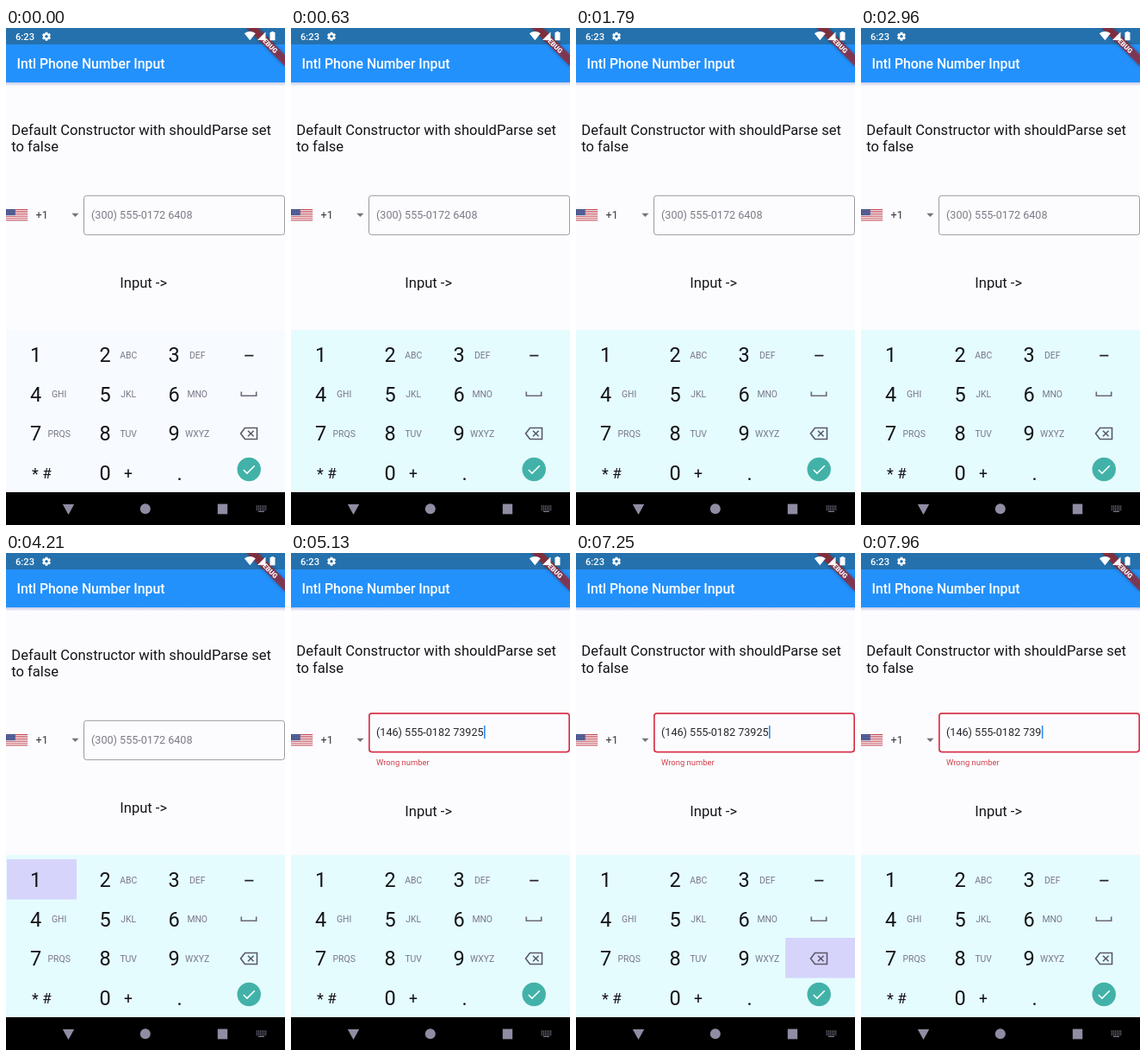
An HTML page with a canvas that plays this animation: 324 by 576 pixels, repeating every 8000 ms.

```html
<!DOCTYPE html>
<html lang="en">
<head>
<meta charset="utf-8">
<title>Phone input</title>
<style>
html, body { margin: 0; width: 100%; height: 100%; overflow: hidden; background: #fcfcfe; }
canvas { display: block; width: 100vw; height: 100vh; }
</style>
</head>
<body>
<canvas id="stage"></canvas>
<script>
const W = 324, H = 576, LOOP = 8000;
const canvas = document.getElementById('stage');
const ctx = canvas.getContext('2d');

const HINT = '(300) 555-0172 6408';
const DIGITS = '146555018273925';
const TYPE_START = 4270, TYPE_STEP = 55, PRESS = 80;
const TYPE_END = TYPE_START + (DIGITS.length - 1) * TYPE_STEP;
const DELETES = [7300, 7700];
const COL_X = [34.5, 115, 195, 282], ROW_Y = [379, 424.5, 470, 515.5];
const LETTERS = ['', 'ABC', 'DEF', 'GHI', 'JKL', 'MNO', 'PRQS', 'TUV', 'WXYZ'];
const INK = '#141418', KEY_GREY = '#787688', NAV_GREY = '#8f8ca3';

function resize() {
  const dpr = window.devicePixelRatio || 1;
  canvas.width = Math.round(innerWidth * dpr);
  canvas.height = Math.round(innerHeight * dpr);
}

function rect(x, y, w, h, color) {
  ctx.fillStyle = color;
  ctx.fillRect(x, y, w, h);
}

function circle(x, y, r, color) {
  ctx.fillStyle = color;
  ctx.beginPath();
  ctx.arc(x, y, r, 0, Math.PI * 2);
  ctx.fill();
}

function trace(points, closed) {
  ctx.beginPath();
  points.forEach(([x, y], i) => i ? ctx.lineTo(x, y) : ctx.moveTo(x, y));
  if (closed) ctx.closePath();
}

function poly(color, ...points) {
  ctx.fillStyle = color;
  trace(points, true);
  ctx.fill();
}

function line(color, width, points, closed = false) {
  ctx.strokeStyle = color;
  ctx.lineWidth = width;
  trace(points, closed);
  ctx.stroke();
}

function text(str, x, y, size, color, weight = 400, align = 'left') {
  ctx.font = `${weight} ${size}px Roboto, sans-serif`;
  ctx.textAlign = align;
  ctx.fillStyle = color;
  ctx.fillText(str, x, y);
}

function formatPhone(d) {
  if (d.length <= 3) return d;
  let s = `(${d.slice(0, 3)}) ${d.slice(3, 6)}`;
  if (d.length > 6) s += '-' + d.slice(6, 10);
  if (d.length > 10) s += ' ' + d.slice(10);
  return s;
}

// Everything that varies with time
function stateAt(t) {
  const typed = t < TYPE_START ? 0
    : Math.min(DIGITS.length, Math.floor((t - TYPE_START) / TYPE_STEP) + 1);
  const deleted = DELETES.filter(d => t >= d).length;
  const lastEdit = deleted ? DELETES[deleted - 1] : Math.min(t, TYPE_END);
  let key = null;
  if (t >= TYPE_START - PRESS && t < TYPE_END) {
    const n = +DIGITS[typed];
    key = n ? [(n - 1) % 3, Math.floor((n - 1) / 3)] : [1, 3];
  } else if (DELETES.some(d => t >= d - PRESS && t < d)) {
    key = [3, 2];
  }
  return {
    phone: formatPhone(DIGITS.slice(0, typed - deleted)),
    cursor: typed > 0 && Math.floor((t - lastEdit) / 500) % 2 === 0,
    fade: Math.max(0, Math.min(1, (t - 40) / 360)),
    key
  };
}

function drawBanner() {
  ctx.save();
  ctx.translate(W, 0);
  ctx.rotate(Math.PI / 4);
  ctx.shadowColor = 'rgba(0,0,0,.5)';
  ctx.shadowBlur = 4;
  rect(-31.5, 22, 63, 9.5, 'rgba(183,28,28,.63)');
  ctx.shadowColor = 'transparent';
  text('DEBUG', 0, 29.6, 8, '#fff', 900, 'center');
  ctx.restore();
}

function drawGear(x, y) {
  ctx.save();
  ctx.translate(x, y);
  for (let i = 0; i < 6; i++) {
    ctx.rotate(Math.PI / 3);
    rect(-1.4, -5, 2.8, 4, '#fff');
  }
  ctx.restore();
  circle(x, y, 3.7, '#fff');
  circle(x, y, 1.7, '#2571ad');
}

function drawStatus() {
  text('6:23', 11, 14, 11.2, '#fff', 500);
  drawGear(47, 9.7);
  ctx.fillStyle = '#fff';
  ctx.beginPath();
  ctx.moveTo(283.3, 14.2);
  ctx.lineTo(276.8, 6.3);
  ctx.quadraticCurveTo(283.3, 1.8, 289.8, 6.3);
  ctx.fill();
  poly('#fff', [292, 14], [301.5, 14], [301.5, 4.5]);
  rect(306.5, 5, 6, 9.3, '#fff');
  rect(308.2, 4, 2.6, 1.2, '#fff');
}

function drawBars() {
  rect(0, 19, W, 44, '#2391fc');
  rect(0, 0, W, 19, '#2571ad');
  const shade = ctx.createLinearGradient(0, 63, 0, 67.5);
  shade.addColorStop(0, '#c4cae8');
  shade.addColorStop(1, '#fcfcfe');
  rect(0, 63, W, 4.5, shade);
  text('Intl Phone Number Input', 12.6, 47, 15.75, '#fff', 500);
  drawBanner();
  drawStatus();
}

function drawFlag() {
  const h = 13.4 / 13;
  for (let i = 0; i < 13; i++) {
    rect(0, 210 + i * h, 25.2, h, i % 2 ? '#f6f2f4' : '#c4414f');
  }
  rect(0, 210, 10.8, 7 * h, '#3f4a86');
  for (let r = 0; r < 4; r++) {
    for (let c = 0; c < 5; c++) rect(1 + c * 2 + (r % 2) * .6, 211 + r * 1.7, .7, .7, '#c9cce2');
  }
}

function drawField(y, color, width) {
  const half = width / 2;
  ctx.strokeStyle = color;
  ctx.lineWidth = width;
  ctx.beginPath();
  ctx.roundRect(90 + half, y + half, 234 - width, 46.4 - width, 3);
  ctx.stroke();
}

function drawForm(s) {
  const error = s.phone !== '';
  const shift = error ? 4.3 : 0;
  text('Default Constructor with shouldParse set', 6.3, 123.6 - shift, 16.55, INK);
  text('to false', 6.3, 143.2 - shift, 16.55, INK);
  text('Input ->', 132.3, 300.5 + shift, 16.55, INK);

  drawFlag();
  text('+1', 34.6, 221, 12.6, '#36363c');
  poly('#747480', [76.3, 214.8], [84.5, 214.8], [80.4, 219]);

  if (!error) {
    drawField(193.8, '#999aa0', 1);
    text(HINT, 99, 220.6, 12.6, '#7c7b88');
    return;
  }
  drawField(185, '#d8344a', 1.7);
  text(s.phone, 99, 211.8, 12.6, '#26262c');
  if (s.cursor) rect(99.4 + ctx.measureText(s.phone).width, 200, 1.6, 15, '#2a8cf0');
  text('Wrong number', 99, 246.4, 9.44, '#d0404c');
}

function drawBackspace() {
  line('#5b5868', 1.6, [[272.5, 470], [277.5, 463.5], [291.5, 463.5], [291.5, 476.5], [277.5, 476.5]], true);
  line('#5b5868', 1.6, [[281, 466.7], [287.6, 473.3]]);
  line('#5b5868', 1.6, [[287.6, 466.7], [281, 473.3]]);
}

function drawKeyboard(s) {
  const mix = (a, b) => Math.round(a + (b - a) * s.fade);
  rect(0, 350, W, 188, `rgb(${mix(247, 229)},${mix(251, 252)},255)`);
  if (s.key) {
    const [c, r] = s.key;
    rect(1 + c * 80.7, 355 + r * 45.5, 81, 46.5, '#d6d4fb');
  }
  LETTERS.forEach((label, i) => {
    const x = COL_X[i % 3], y = ROW_Y[Math.floor(i / 3)];
    text(String(i + 1), x, y + 8.4, 23.5, INK, 400, 'center');
    text(label, x + 27.2, y + 3.6, 10.4, KEY_GREY, 400, 'center');
  });
  text('*', 34, 523, 18, INK, 400, 'center');
  text('#', 47.5, 522.3, 17, INK, 400, 'center');
  text('0', 115, 524, 23.5, INK, 400, 'center');
  text('+', 142, 522, 17.5, INK, 400, 'center');
  text('.', 201.5, 524, 23.5, INK, 400, 'center');

  rect(277.2, 378.8, 10.2, 1.7, '#24242c');
  line('#6a6878', 1.6, [[273.3, 421.5], [273.3, 426.3], [290.7, 426.3], [290.7, 421.5]]);
  drawBackspace();
  circle(282.2, 511.5, 13.7, '#42b2a8');
  line('#fff', 1.5, [[275.8, 512], [279.9, 516.1], [288.8, 507.2]]);
}

function drawNav() {
  rect(0, 538, W, 38, '#000');
  poly(NAV_GREY, [65.8, 552], [79.2, 552], [72.5, 564]);
  circle(161.8, 557.3, 6, NAV_GREY);
  rect(245.8, 551.6, 11.4, 11.8, NAV_GREY);
  for (let r = 0; r < 3; r++) {
    for (let c = 0; c < 6; c++) rect(290.6 + c * 2.1, 553.5 + r * 2.1, 1.2, 1.2, NAV_GREY);
  }
  rect(293, 559.8, 7, 1.1, NAV_GREY);
}

function frame() {
  const s = stateAt(performance.now() % LOOP);
  ctx.setTransform(canvas.width / W, 0, 0, canvas.height / H, 0, 0);
  rect(0, 0, W, H, '#fcfcfe');
  drawBars();
  drawForm(s);
  drawKeyboard(s);
  drawNav();
  requestAnimationFrame(frame);
}

addEventListener('resize', resize);
resize();
frame();
</script>
</body>
</html>
```
